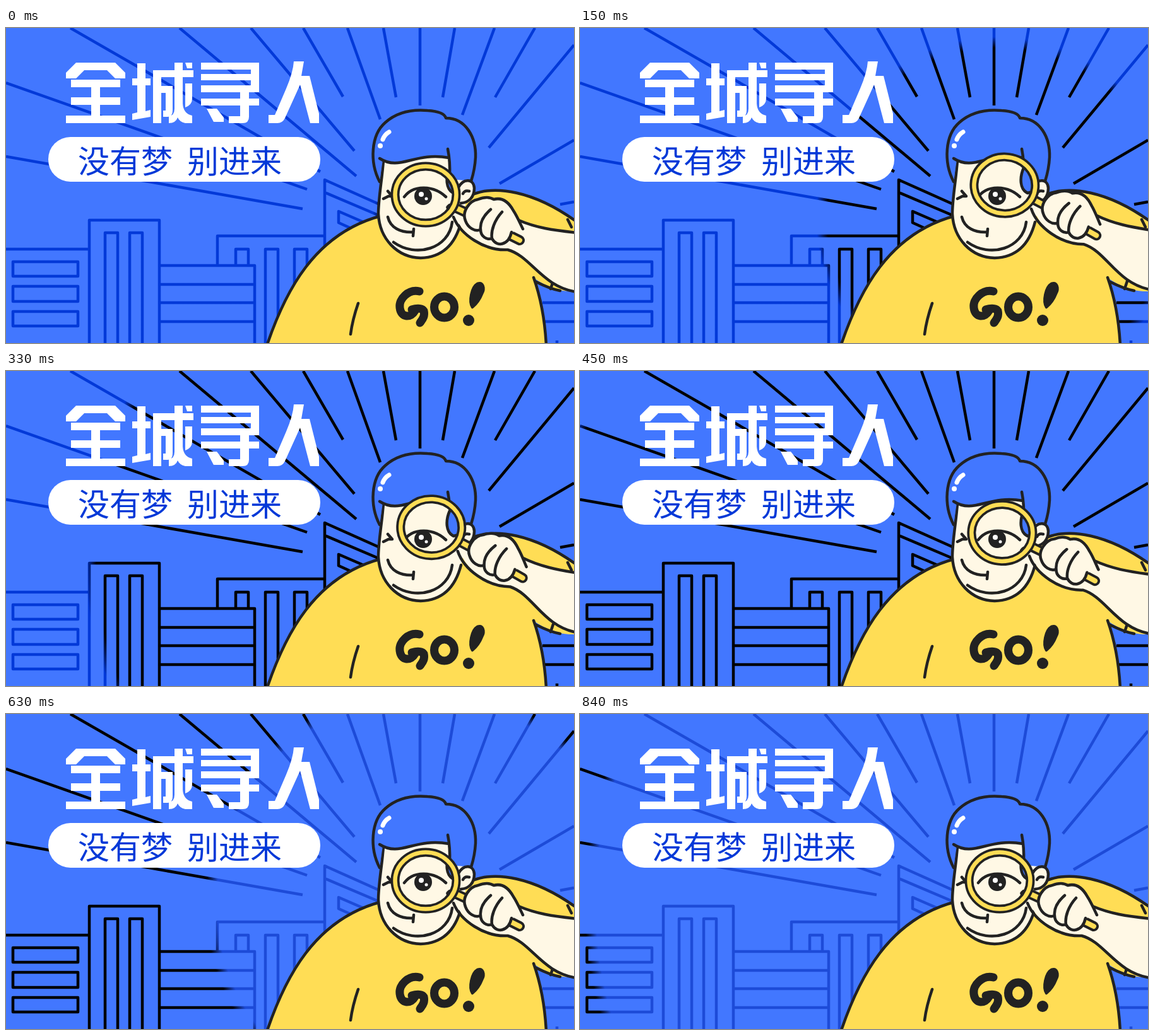
Recreate the animation shown at these times as an HTML page. Size 900x500 px, loop 870 ms.

```html
<!DOCTYPE html>
<html lang="zh-CN">
<head>
<meta charset="utf-8">
<style>
html, body { margin: 0; width: 100%; height: 100%; overflow: hidden; background: #4277ff; }
svg { display: block; width: 900px; height: 500px; }
.ink { stroke: #222; stroke-width: 4.5; stroke-linecap: round; stroke-linejoin: round; }
.bold { stroke-width: 13; }
.label { font: 500 50px "Noto Sans CJK SC", "Noto Sans CJK", sans-serif; fill: #0339d8; }
</style>
</head>
<body>
<svg viewBox="0 0 900 500" fill="none">
  <defs>
    <radialGradient id="wave" gradientUnits="userSpaceOnUse" cx="660" cy="300" r="900">
      <stop/><stop/>
    </radialGradient>
    <clipPath id="glass"><ellipse class="swing" cx="665" cy="264.5" rx="43" ry="40"/></clipPath>
  </defs>
  <rect width="900" height="500" fill="#4277ff"/>

  <g stroke="url(#wave)" stroke-width="4.5">
    <!-- rays -->
    <path d="M0 87L477 256M0 204L470 287M102 0L498 228M275 0L555 235M388 0L552 195M471 0L534 109
      M541 0L593 145M598 0L618 110M656 0V123M711 0L692 110M774 0L723 138M838 0L775 110
      M900 27L765 190M900 178L782 247M900 276L878 280"/>
    <!-- skyline -->
    <path stroke-linejoin="round" d="M0 351H132M11 371H114V394H11ZM11 410H114V434H11ZM11 450H114V473H11Z
      M132 502V305H243V502M157 502V325H177V502M196 502V325H216V502
      M243 377H394V502M243 407H394M243 436H394M243 466H394
      M335 377V330H505M364 377V351H384V377M411 502V351H431V502M457 502V351H477V502
      M505 402V241L592 280M505 261L592 298M560 324L527 309V291L580 314
      M850 436H900M850 466H900M873 496V502"/>
  </g>

  <!-- headline lettering -->
  <g fill="#fff" role="img" aria-label="全城寻人">
    <path d="M111 55H173L189 71V80H173L160 67H124L111 80H95V71Z
      M103 82H181V94H103ZM103 110H181V122H103ZM95 139H189V151H95ZM135 84H149V145H135Z"/>
    <path d="M208 56H221V80H229V91H221V132L229 130V141L200 146V136L208 134V91H200V80H208Z
      M233 67H267V55H280V67H297V78H280V120Q281 136 295 139V151H284Q275 149 272 142Q269 151 258 151V140Q267 139 267 128V78H246V151H233Z
      M246 92H264V131Q264 141 256 141H249V131H253V103H246ZM284 88H295V112Q295 122 284 126ZM284 55H295V64H287Z"/>
    <path d="M309 55H401V102H309V91H388V83H309V73H388V66H309Z
      M309 112H371V102H385V112H401V123H385V141Q385 151 375 151H353V140H371V123H309ZM318 128H334L345 142V149H329Z"/>
    <path d="M456 53H472L468 76H481L496 136V151H482L466 90L442 143Q438 151 430 151H416V138H426L444 96Q455 70 456 53Z"/>
  </g>
  <rect x="67" y="173" width="431" height="71" rx="35" fill="#fff"/>
  <text class="label" x="114" y="230">没有梦</text>
  <text class="label" x="287" y="230">别进来</text>

  <!-- body -->
  <path fill="#ffdd55" d="M414 502C442 420 488 326 595 298L740 264C775 250 835 258 900 306V418
    C875 419 852 408 837 397C848 430 854 465 856 502Z"/>
  <path class="ink" d="M414 502C442 420 488 326 595 298M740 264C775 250 835 258 902 306
    M836 396C848 430 854 465 856 504M838 402C852 409 866 415 878 417M867 402L863 414M890 304L896 316
    M558 437Q549 463 546 486"/>
  <path class="ink bold" d="M655 418C638 414 622 430 624 444C626 461 642 460 648 449M643 447C652 444 660 445 662 449C664 458 660 462 656 468"/>
  <ellipse class="ink bold" cx="694.5" cy="443" rx="16" ry="17"/>
  <path class="ink" fill="#222" d="M739 443C733 434 738 411 747 406C756 403 759 413 754 422Q749 435 739 443Z"/>
  <circle cx="733" cy="464" r="9" fill="#222"/>

  <!-- head -->
  <path fill="#fff8e5" d="M598 208C596 240 590 270 590 295C592 335 620 364 657 365C695 364 716 340 723 300L738 240L700 195Z"/>
  <path class="ink" d="M598 210C596 240 590 270 590 295C592 335 620 364 657 365C692 364 712 343 721 308
    M614 340C650 366 702 350 707 308M605 300C609 317 625 325 645 324M646 319L645 330
    M598 271L606 267L612 267L605 259"/>
  <path fill="#4277ff" d="M592 244C576 213 578 170 601 150C620 133 645 129 668 131C685 132 695 136 697 143
    C729 143 745 174 744 205Q743 224 737 243L706 240L702 206C646 196 625 228 597 209Z"/>
  <path class="ink" d="M592 244C576 213 578 170 601 150C620 133 645 129 668 131C685 132 695 136 697 143
    C729 143 745 174 744 205Q743 224 737 243M592 207C625 228 646 196 702 206M700 192Q704 212 703 236"/>
  <path stroke="#fff" stroke-width="7" stroke-linecap="round" d="M597 177Q600 169 607 165"/>
  <circle cx="593" cy="187" r="4" fill="#fff"/>
  <path class="ink" fill="#fff8e5" d="M717 253C725 238 741 239 742 254C742 268 734 277 721 278"/>
  <path class="ink" d="M724 263Q727 257 734 259"/>

  <!-- arm and hand -->
  <g class="swing">
    <path fill="#fff8e5" d="M711 294C720 328 758 354 795 352C832 362 850 412 905 419L960 424V328L905 325C866 321 840 317 816 305L760 280Z"/>
    <path class="ink" d="M709 300C720 328 758 354 795 352C832 362 850 412 905 419L960 424M960 328L905 325C866 321 840 317 812 305"/>
    <g stroke-linecap="round">
      <path stroke="#222" stroke-width="16" d="M714 286L740 298M790 325L814 337"/>
      <path stroke="#ffdd55" stroke-width="8" d="M714 286L740 298M790 325L814 337"/>
    </g>
    <path fill="#fff8e5" d="M728 306C722 292 734 274 748 272C760 267 768 269 773 272C788 268 798 279 804 290L819 319
      L799 325C796 346 777 348 770 334C762 337 752 331 752 320C743 324 732 317 728 306Z"/>
    <path class="ink" d="M819 319C814 309 810 299 804 290C798 279 788 268 773 272C768 269 760 267 748 272
      C734 274 722 292 728 306C732 317 743 324 752 320C752 331 762 337 770 334C777 348 796 346 801 324
      M752 320C751 311 754 300 768 288M770 334C768 322 774 305 786 292"/>
    <ellipse cx="665" cy="264.5" rx="45" ry="42" fill="#fff8e5"/>
  </g>

  <!-- view through the glass -->
  <g clip-path="url(#glass)">
    <path class="ink" fill="#4277ff" d="M703 222C696 238 697 256 709 262L724 258V222Z"/>
    <path id="lobe" fill="#222" d="M697 284Q702 276 712 278L708 294Q698 293 697 284Z"/>
  </g>
  <path class="ink" d="M631 268C645 249 677 249 697 268"/>
  <circle cx="661" cy="267" r="14" fill="#222"/>
  <circle cx="658" cy="264" r="4" fill="#fff"/>
  <circle cx="666" cy="271" r="2.5" fill="#fff"/>

  <g class="swing">
    <ellipse cx="665" cy="264.5" rx="48.5" ry="45" stroke="#222" stroke-width="14"/>
    <ellipse cx="665" cy="264.5" rx="48.5" ry="45" stroke="#ffdd55" stroke-width="6.5"/>
  </g>
</svg>
<script>
const LOOP = 870, STEP = 30, SECOND_WAVE = 480, SWING = 510;
const stops = document.querySelectorAll('#wave stop');
const swinging = document.querySelectorAll('.swing');
const lobe = document.getElementById('lobe');

function setWave(radius, inner, outer) {
  [[radius - 9, inner], [radius + 9, outer]].forEach(([r, color], i) => {
    stops[i].setAttribute('offset', r / 900);
    stops[i].setAttribute('stop-color', color);
  });
}

function draw(now) {
  const t = Math.floor(now % LOOP / STEP) * STEP;
  if (t < SECOND_WAVE) setWave(70 + 1.38 * t, '#000', '#0339d8');
  else setWave(203 + 1.47 * (t - 540), '#1d4bd8', '#000');

  const lift = Math.max(0, 4 * t * (SWING - t) / SWING ** 2);
  for (const el of swinging) el.setAttribute('transform', `rotate(${3.35 * lift} 975 420)`);
  lobe.style.display = lift < 0.6 ? '' : 'none';
  requestAnimationFrame(draw);
}
draw(performance.now());
</script>
</body>
</html>
```
